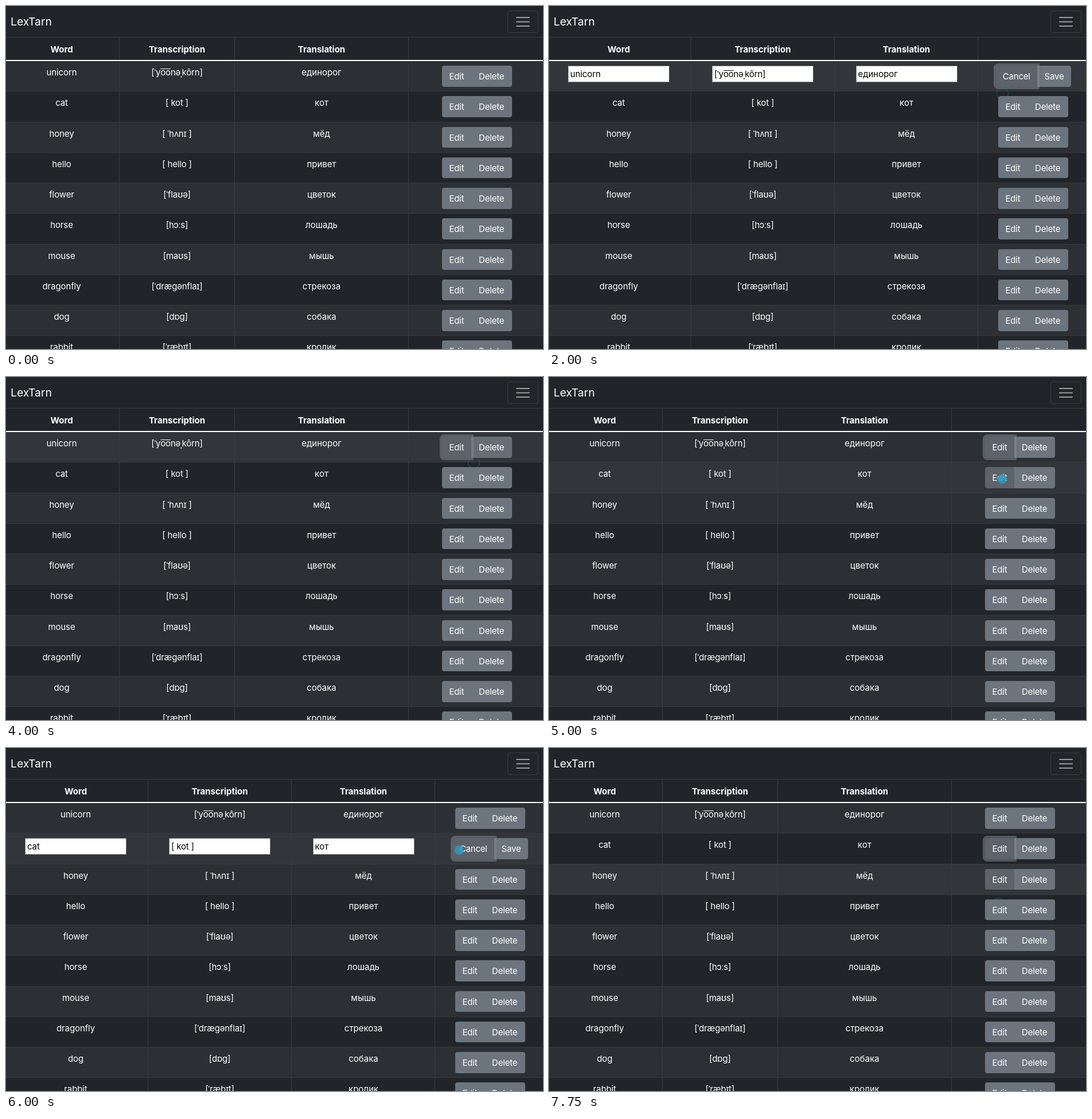
Recreate the animation shown at these times as an HTML page. Size 936 px wide and 598 px high, loop 8000 ms.

```html
<!DOCTYPE html>
<html lang="en">
<head>
<meta charset="utf-8">
<title>Word table</title>
<style>
html, body { margin: 0; width: 100%; height: 100%; overflow: hidden; background: #212529; }
#stage {
  position: relative; width: 936px; height: 598px; overflow: hidden;
  background: #212529; color: #fff;
  font: 15px/23px Inter, "Noto Sans", sans-serif;
  --x1: 97px; --x2: 298px; --x3: 550px;
  --l1: 197px; --l2: 398px; --l3: 701px; --btn: 760px;
}
#stage.wide {
  --x1: 121.5px; --x2: 372.5px; --x3: 623px;
  --l1: 247px; --l2: 497px; --l3: 747px; --btn: 783px;
}
#stage div, #stage b { position: absolute; box-sizing: border-box; white-space: nowrap; }
.brand { left: 8px; top: 13px; font-size: 19.3px; line-height: 28px; }
.toggle { left: 874px; top: 8px; width: 54px; height: 39px; border: 1px solid rgba(255,255,255,.1); border-radius: 4px; }
.toggle::before {
  content: ""; position: absolute; left: 14px; top: 10px; width: 24px; height: 2px; border-radius: 1px;
  color: rgba(255,255,255,.55); background: currentColor; box-shadow: 0 7.5px, 0 15px;
}
.top { left: 0; top: 54px; width: 936px; height: 1px; background: #373b3e; }
.rule { left: 0; top: 94px; width: 936px; height: 2px; background: #fff; }
.line { top: 55px; width: 1px; height: 543px; background: #373b3e; }
.c1 { left: var(--x1); } .c2 { left: var(--x2); } .c3 { left: var(--x3); }
.l1 { left: var(--l1); } .l2 { left: var(--l2); } .l3 { left: var(--l3); }
.cell, b { width: 177px; margin-left: -88.5px; text-align: center; }
b { top: 63.5px; }
.cell { top: 8px; height: 23px; }
.c1.cell { letter-spacing: -.1px; }
.c2.cell { letter-spacing: -.2px; }
.row { left: 0; width: 936px; height: 53.25px; border-bottom: 1px solid #373b3e; }
.row:nth-child(odd) { background: #2c3034; }
#stage .row.over { background: #323539; }
.btn { top: 8px; height: 36.5px; line-height: 37px; text-align: center; background: #6c757d; letter-spacing: -.2px; }
.main { left: var(--btn); width: 51px; border-radius: 4px 0 0 4px; }
.side { left: calc(var(--btn) + 51px); width: 70.5px; border-radius: 0 4px 4px 0; }
.hot .main, .focus .main { background: #5c636a; }
.focus .main { z-index: 1; box-shadow: 0 0 0 4px rgba(130,138,145,.5); }
.dim .side { background: #666e76; }
.edit .cell {
  height: 29px; padding-left: 3px; line-height: 28px; text-align: left;
  background: #fff; color: #000; border: 1px solid #767676;
}
.edit .main { left: 778.5px; width: 72.5px; }
.edit .side { left: 851px; width: 59px; }
.oo { position: relative; }
.oo::before { content: ""; position: absolute; left: 0; right: 0; top: 2.6px; height: 1.2px; background: currentColor; }
#dot, #ring { border-radius: 50%; z-index: 3; }
#dot { width: 16px; height: 16px; margin: -8px; background: #259bc4; opacity: .85; }
#ring { width: 21px; height: 21px; margin: -10.5px; border: 1.5px solid #2487a8; }
</style>
</head>
<body>
<div id="stage">
  <div class="brand">LexTarn</div>
  <div class="toggle"></div>
  <div class="top"></div>
  <b class="c1">Word</b><b class="c2">Transcription</b><b class="c3">Translation</b>
  <div id="rows"></div>
  <div class="line l1"></div><div class="line l2"></div><div class="line l3"></div>
  <div class="rule"></div>
  <div id="dot"></div>
  <div id="ring"></div>
</div>
<script>
const LOOP = 8000, TICK = 250, ROW = 53.25;
const words = [
  ['unicorn', '[ˈy<span class="oo">oo</span>nəˌkôrn]', 'единорог'],
  ['cat', '[ kot ]', 'кот'],
  ['honey', '[ ˈhʌnɪ ]', 'мёд'],
  ['hello', '[ hello ]', 'привет'],
  ['flower', '[ˈflaʊə]', 'цветок'],
  ['horse', '[hɔːs]', 'лошадь'],
  ['mouse', '[maʊs]', 'мышь'],
  ['dragonfly', '[ˈdrægənflaɪ]', 'стрекоза'],
  ['dog', '[dɒg]', 'собака'],
  ['rabbit', '[ˈræbɪt]', 'кролик']
];

// Each step changes part of the state; edit, over, hot, focus and dim hold row indexes.
const steps = [
  [0, { edit: -1, over: -1, hot: -1, focus: -1, dim: -1, dot: null, ring: null }],
  [250, { dot: [800, 62] }],
  [500, { dot: [796, 106] }],
  [750, { dot: [794, 132] }],
  [1500, { dot: null, ring: [790, 152], hot: 0 }],
  [1750, { focus: 0 }],
  [2000, { edit: 0, over: 0 }],
  [2750, { dot: [809, 133], ring: null }],
  [3000, { dot: [819, 129.5] }],
  [4000, { edit: -1, hot: -1, dim: 0, dot: null, ring: [815, 149] }],
  [4250, { dim: -1 }],
  [4500, { ring: null }],
  [4750, { over: 1, hot: 1, dot: [797, 165] }],
  [5000, { dot: [790, 178] }],
  [5250, { edit: 1, focus: -1, dot: null, ring: [786, 198] }],
  [5500, { focus: 1 }],
  [6000, { dot: [790, 178], ring: null }],
  [6750, { edit: -1, dot: null, ring: [786, 198] }],
  [7000, { dot: [789, 217], ring: null }],
  [7250, { over: 2, hot: 2, dot: null, ring: [783, 271] }]
];

const $ = id => document.getElementById(id);
const stage = $('stage'), dot = $('dot'), ring = $('ring');

$('rows').innerHTML = words.map((cells, i) =>
  `<div class="row" style="top:${96 + i * ROW}px">` +
  cells.map((text, c) => `<div class="cell c${c + 1}">${text}</div>`).join('') +
  '<div class="btn main">Edit</div><div class="btn side">Delete</div></div>').join('');
const rows = [...document.querySelectorAll('.row')];

function place(el, pos) {
  el.style.display = pos ? 'block' : 'none';
  if (pos) [el.style.left, el.style.top] = pos.map(v => v + 'px');
}

function stateAt(t) {
  const state = {};
  for (const [start, change] of steps) {
    if (start > t) break;
    Object.assign(state, change);
    if (change.ring) state.ringStart = start;
  }
  return state;
}

function draw(t) {
  const s = stateAt(t);
  stage.classList.toggle('wide', s.edit >= 0);
  rows.forEach((row, i) => {
    for (const name of ['edit', 'over', 'hot', 'focus', 'dim']) row.classList.toggle(name, s[name] === i);
    row.querySelector('.main').textContent = s.edit === i ? 'Cancel' : 'Edit';
    row.querySelector('.side').textContent = s.edit === i ? 'Save' : 'Delete';
  });
  place(dot, s.dot);
  place(ring, s.ring);
  if (s.ring) ring.style.opacity = Math.max(.2, .6 - .1 * (t - s.ringStart) / TICK);
}

let last = -1;
function tick() {
  const t = Math.floor(performance.now() % LOOP / TICK) * TICK;
  if (t !== last) draw(last = t);
  requestAnimationFrame(tick);
}
tick();
</script>
</body>
</html>
```
